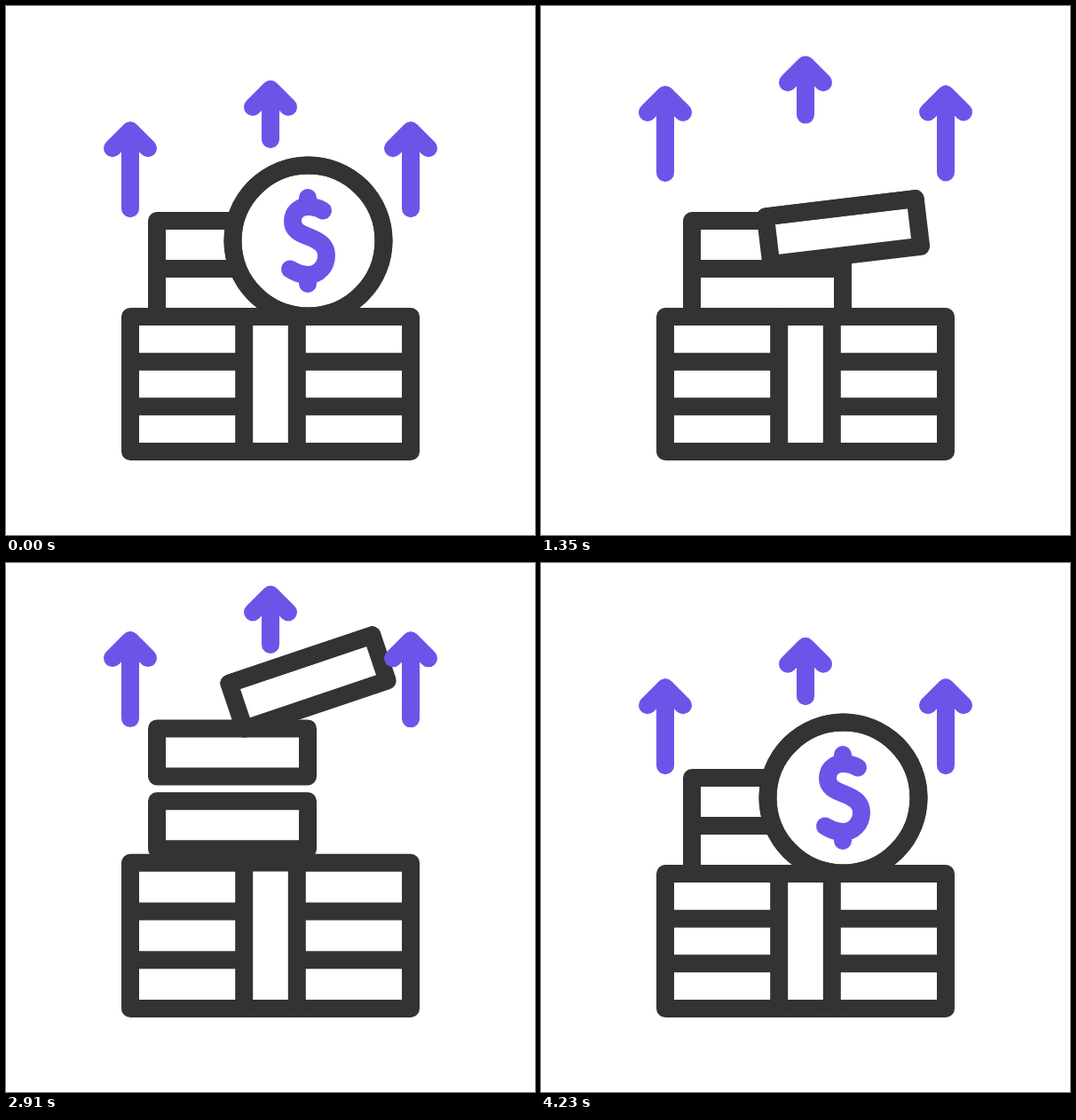
An HTML page with a canvas that plays this animation: 596 by 596 pixels, repeating every 4.8 s.

```html
<!DOCTYPE html>
<html lang="en">
<head>
<meta charset="utf-8">
<title>Growing savings</title>
<style>
  html, body { margin: 0; width: 100%; height: 100%; overflow: hidden; background: #fff; }
  canvas { display: block; width: 596px; height: 596px; }
</style>
</head>
<body>
<canvas id="stage"></canvas>
<script>
const SIZE = 596, LOOP = 4800, STEP = 30;
const DARK = '#333333', VIOLET = '#6c54e9', WHITE = '#ffffff';
const WEIGHT = 20, RADIUS = 85, THICK = 54;
const JUMP = 2160, PEAK = 3054;
const ARROW_LIFT = 58.5, ARROW_HALF = 1080;

const canvas = document.getElementById('stage');
const ctx = canvas.getContext('2d');
const ratio = window.devicePixelRatio || 1;
canvas.width = canvas.height = SIZE * ratio;

const smooth = u => u * u * (3 - 2 * u);
const gravity = u => u * u;

// 0 before a, 1 after b, eased between
function ramp(t, a, b, ease = smooth) {
  return ease(Math.min(1, Math.max(0, (t - a) / (b - a))));
}

// Up until peak, hold until drop, back down at end
function hop(t, height, peak, drop, end, ease) {
  return height * (ramp(t, 0, peak) - ramp(t, drop, end, ease));
}

// Two rises and falls; only the first rise has its own length
function swing(t, first) {
  const turn = t < first ? t / first : Math.min(4, 1 + (t - first) / ARROW_HALF);
  return ARROW_LIFT * smooth(1 - Math.abs(turn % 2 - 1));
}

function stroke(color) {
  ctx.strokeStyle = color;
  ctx.stroke();
}

function fill(color) {
  ctx.fillStyle = color;
  ctx.fill();
}

function box(x, y, w, h) {
  ctx.beginPath();
  ctx.rect(x, y, w, h);
  fill(WHITE);
  stroke(DARK);
}

function line(x0, y0, x1, y1) {
  ctx.beginPath();
  ctx.moveTo(x0, y0);
  ctx.lineTo(x1, y1);
  stroke(DARK);
}

function bundle(lift) {
  const left = 140, right = 456, bottom = 502, top = 350 - lift;
  const bandLeft = 268.2, bandRight = 327.8, inset = 4;
  box(left, top, right - left, bottom - top);
  for (const part of [1 / 3, 2 / 3]) {
    const y = top + (bottom - top) * part;
    line(left + inset, y, bandLeft, y);
    line(bandRight, y, right - inset, y);
  }
  ctx.fillStyle = WHITE;
  ctx.fillRect(bandLeft, top + WEIGHT / 2, bandRight - bandLeft, bottom - top - WEIGHT);
  for (const x of [bandLeft, bandRight]) line(x, top + inset, x, bottom - inset);
}

function arrow(x, tip, length) {
  const wing = 20;
  ctx.beginPath();
  ctx.moveTo(x - wing, tip + wing);
  ctx.lineTo(x, tip);
  ctx.lineTo(x + wing, tip + wing);
  ctx.moveTo(x, tip);
  ctx.lineTo(x, tip + length);
  stroke(VIOLET);
}

function dollarPath() {
  const end = 38.5, tick = 10;
  ctx.beginPath();
  ctx.moveTo(16.5, -34);
  ctx.bezierCurveTo(10, -38, 5, -end, -0.5, -end);
  ctx.bezierCurveTo(-11.5, -end, -17.5, -31, -17.5, -22);
  ctx.bezierCurveTo(-17.5, -12, -10, -8.5, 0.5, -4.5);
  ctx.bezierCurveTo(13.5, 0.5, 20.5, 6, 20.5, 16.5);
  ctx.bezierCurveTo(20.5, 29, 11.5, end, -0.5, end);
  ctx.bezierCurveTo(-8.5, end, -13.5, 36, -20.5, 32);
  for (const side of [-1, 1]) {
    ctx.moveTo(-0.5, side * end);
    ctx.lineTo(-0.5, side * (end + tick));
  }
}

// open: 0 is edge-on, 1 faces the viewer
function coin(y, tilt, open) {
  const ry = RADIUS * open, half = THICK * (1 - open) / 2;
  const facePath = () => {
    ctx.beginPath();
    ctx.ellipse(0, -half, RADIUS, ry, 0, 0, Math.PI * 2);
  };
  ctx.save();
  ctx.translate(340.5, y);
  ctx.rotate(-tilt * Math.PI / 180);

  ctx.beginPath();
  ctx.ellipse(0, -half, RADIUS, ry, 0, Math.PI, Math.PI * 2);
  ctx.ellipse(0, half, RADIUS, ry, 0, 0, Math.PI);
  ctx.closePath();
  fill(WHITE);
  stroke(DARK);

  if (open > 0) {
    ctx.save();
    facePath();
    ctx.clip();
    // Flatten the sign but keep its line weight
    ctx.save();
    ctx.translate(0, -half);
    ctx.scale(1, open);
    ctx.rotate(Math.PI / 2);
    dollarPath();
    ctx.restore();
    stroke(VIOLET);
    ctx.restore();
  }
  facePath();
  stroke(DARK);
  ctx.restore();
}

function drawCoin(t) {
  const y = 264.5 - 137.5 * ramp(t, 0, 870) + 196 * ramp(t, 870, 1670)
    - 203 * ramp(t, JUMP, PEAK) + 144.5 * ramp(t, PEAK, 3970);
  const tilt = 90 - 70.6 * ramp(t, 0, 780) - 19.4 * ramp(t, 900, 1650)
    + 20 * ramp(t, JUMP, PEAK) + 70 * ramp(t, PEAK, 3990);
  const open = 1 - ramp(t, 0, 930) + ramp(t, PEAK, 4060);
  coin(y, tilt, open);
}

function draw(t) {
  const jump = t % JUMP;
  ctx.setTransform(ratio, 0, 0, ratio, 0, 0);
  ctx.fillStyle = WHITE;
  ctx.fillRect(0, 0, SIZE, SIZE);
  ctx.lineWidth = WEIGHT;
  ctx.lineCap = ctx.lineJoin = 'round';

  // Both jumps lift the piles alike; the loop ends on a rest
  const active = t < 2 * JUMP ? jump : 0;
  box(170, 242 - hop(active, 61, 440, 520, 1290, gravity), 170, THICK);
  box(170, 296 - hop(active, 46, 500, 500, 1080), 170, THICK);
  bundle(hop(active, 40, 390, 390, 960));
  drawCoin(t);

  arrow(298, 93.8 - swing(t, 790), 56.4);
  arrow(140, 140.3 - swing(t, 950), 88);
  arrow(456, 140.3 - swing(t, 955), 88);
}

const start = performance.now();
function tick() {
  const t = Math.max(0, performance.now() - start) % LOOP;
  draw(Math.floor(t / STEP) * STEP);
  requestAnimationFrame(tick);
}
tick();
</script>
</body>
</html>
```
